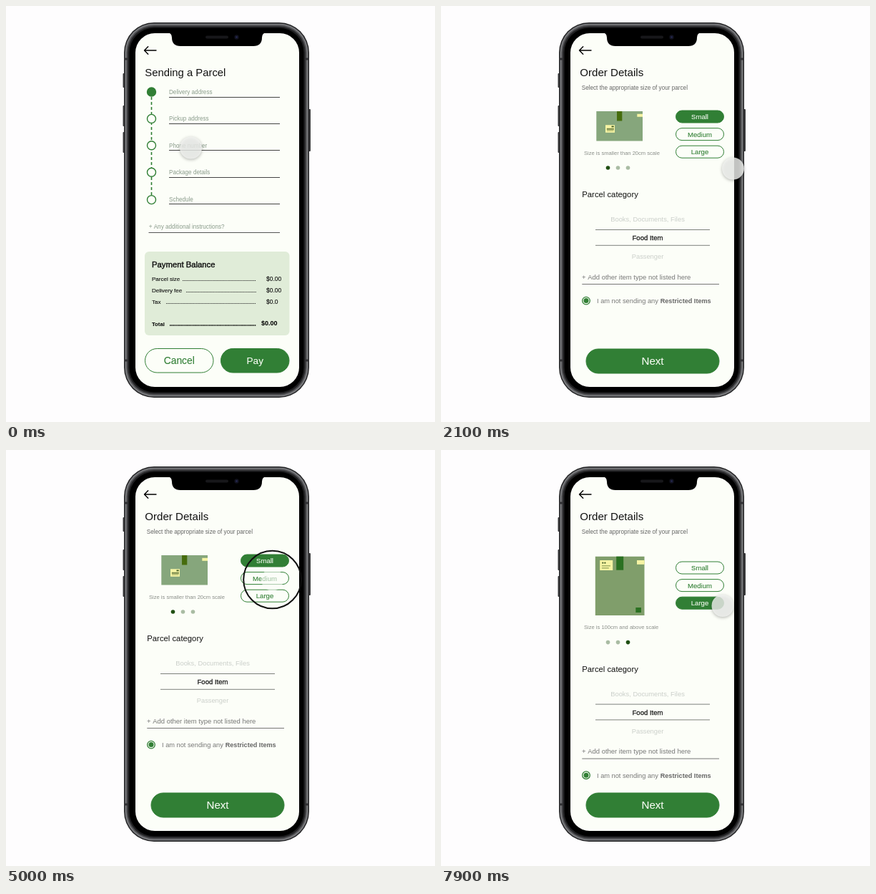
Animation of 600x581 px, one loop 8 s. Source, as an HTML page with a canvas:

```html
<!DOCTYPE html>
<html lang="en">
<head>
<meta charset="utf-8">
<title>Parcel order</title>
<style>
  html, body { margin: 0; width: 100%; height: 100%; overflow: hidden; background: #fefdfe; }
  canvas { display: block; width: 600px; height: 581px; }
</style>
</head>
<body>
<canvas id="stage"></canvas>
<script>
const W = 600, H = 581, LOOP = 8000;
const GREEN = '#317f35', BG = '#fcfef8', HINT = '#8a9b8b', YELLOW = '#f6f4a4';
const canvas = document.getElementById('stage');
const ctx = canvas.getContext('2d');
const ratio = window.devicePixelRatio || 1;
canvas.width = W * ratio;
canvas.height = H * ratio;

function box(x, y, w, h, r, fill, stroke, width = 1) {
  ctx.beginPath();
  ctx.roundRect(x, y, w, h, r);
  if (fill) { ctx.fillStyle = fill; ctx.fill(); }
  if (stroke) { ctx.strokeStyle = stroke; ctx.lineWidth = width; ctx.stroke(); }
}

function disc(x, y, r, fill, stroke, width = 1.4) {
  ctx.beginPath();
  ctx.arc(x, y, r, 0, Math.PI * 2);
  if (fill) { ctx.fillStyle = fill; ctx.fill(); }
  if (stroke) { ctx.strokeStyle = stroke; ctx.lineWidth = width; ctx.stroke(); }
}

function line(x1, y1, x2, y2, color, width = 1, dash = []) {
  ctx.setLineDash(dash);
  ctx.strokeStyle = color;
  ctx.lineWidth = width;
  ctx.beginPath();
  ctx.moveTo(x1, y1);
  ctx.lineTo(x2, y2);
  ctx.stroke();
  ctx.setLineDash([]);
}

// heavy: extra outline that gives a medium weight
function text(s, x, y, size, color, { bold = false, align = 'left', heavy = 0 } = {}) {
  ctx.font = `${bold ? 'bold ' : ''}${size}px "Liberation Sans", Arial, sans-serif`;
  ctx.textAlign = align;
  ctx.fillStyle = color;
  ctx.fillText(s, x, y);
  if (heavy) {
    ctx.strokeStyle = color;
    ctx.lineWidth = heavy;
    ctx.strokeText(s, x, y);
  }
}

function pill(label, x, y, w, h, size, filled) {
  box(x, y, w, h, h / 2, filled ? GREEN : BG, GREEN, 1);
  text(label, x + w / 2, y + h / 2 + size * 0.36, size, filled ? '#f6fbf2' : GREEN, { align: 'center', heavy: 0.1 });
}

function phone() {
  for (const [x, y, w, h] of [[163.5, 94, 3, 20], [163.5, 139, 3, 29], [163.5, 176, 3, 29], [423, 144, 3, 59]])
    box(x, y, w, h, 1, '#3a3a3c');
  const shells = [[0, '#202022'], [1.4, '#77787b'], [3.6, '#4a4a4d'], [5.4, '#202022'], [7.6, '#000']];
  for (const [d, color] of shells)
    box(165 + d, 23 + d, 259 - 2 * d, 524 - 2 * d, 42 - d, color);
  for (const y of [72.5, 493.5]) {
    box(165, y, 6, 3, 0, '#303033');
    box(418, y, 6, 3, 0, '#303033');
  }
  box(181, 38, 229, 494, 27, BG);

  ctx.fillStyle = '#000';
  ctx.beginPath();
  ctx.moveTo(226, 37);
  ctx.quadraticCurveTo(232, 38, 232, 44);
  ctx.quadraticCurveTo(232, 56, 244, 56);
  ctx.lineTo(346, 56);
  ctx.quadraticCurveTo(358, 56, 358, 44);
  ctx.quadraticCurveTo(358, 38, 364, 37);
  ctx.fill();
  box(279, 41.5, 32, 4, 2, '#17171a');
  disc(322.5, 43.5, 3.2, '#11121e');
  disc(322.5, 43.5, 1.4, '#23264c');
}

function header(title) {
  ctx.lineCap = ctx.lineJoin = 'round';
  ctx.strokeStyle = '#000';
  ctx.lineWidth = 1.4;
  ctx.beginPath();
  ctx.moveTo(210, 62);
  ctx.lineTo(193.5, 62);
  ctx.moveTo(198.7, 56.8);
  ctx.lineTo(193.5, 62);
  ctx.lineTo(198.7, 67.2);
  ctx.stroke();
  ctx.lineCap = 'butt';
  ctx.lineJoin = 'miter';
  text(title, 194.3, 97.5, title.length > 14 ? 14.85 : 15.1, '#111');
}

function formScreen() {
  header('Sending a Parcel');
  line(203.5, 120, 203.5, 270, GREEN, 1.6, [4, 3]);
  const rows = ['Delivery address', 'Pickup address', 'Phone number', 'Package details', 'Schedule'];
  rows.forEach((label, i) => {
    const y = 120 + i * 37.4;
    disc(203.5, y + (i === 4 ? 1 : 0), 6, i ? BG : GREEN, GREEN);
    text(label, 228, y + 3, 8.13, HINT);
    line(228, Math.round(y + 6.5) + 0.5, 383, Math.round(y + 6.5) + 0.5, '#444');
  });
  text('+ Any additional instructions?', 199.7, 311, 8.13, HINT);
  line(199.5, 316.5, 383, 316.5, '#555');

  box(194, 343, 202.5, 117, 6, '#e0ecd8');
  text('Payment Balance', 204, 364.5, 11.3, '#111', { heavy: 0.4 });
  const costs = [['Parcel size', 247, '$0.00', 384], ['Delivery fee', 252, '$0.00', 400], ['Tax', 224, '$0.0', 416]];
  for (const [label, x, cost, y] of costs) {
    text(label, 204, y, 8, '#111', { heavy: 0.12 });
    line(x, y - 0.5, 350, y - 0.5, '#333', 1, [1.2, 0.9]);
    text(cost, 364, y, 8.5, '#111', { heavy: 0.12 });
  }
  text('Total', 204, 446.5, 7.7, '#000', { bold: true });
  line(229, 446, 350, 446, '#000', 1.3, [1.5, 0.7]);
  text('$0.00', 357, 446, 9, '#000', { bold: true });

  pill('Cancel', 194.5, 478.5, 95.5, 33.5, 13.9, false);
  pill('Pay', 300.5, 478.5, 95.5, 33.5, 13.6, true);
}

function note(x, y, w, h, angle = 0) {
  ctx.save();
  ctx.translate(x, y);
  ctx.rotate(angle);
  box(-w / 2, -h / 2, w, h, 0, YELLOW);
  disc(-w * 0.27, -h * 0.24, w * 0.06, '#405a22');
  disc(-w * 0.1, -h * 0.24, w * 0.06, '#405a22');
  line(-w * 0.35, h * 0.06, w * 0.32, h * 0.06, '#71843f', 0.9);
  line(-w * 0.35, h * 0.28, w * 0.2, h * 0.28, '#71843f', 0.9);
  ctx.restore();
}

const parcels = [
  () => {
    box(217.3, 147, 64.7, 41.5, 0, '#86a67c');
    box(246, 147, 7.3, 13.5, 0, '#466c0e');
    box(274.3, 150.8, 7.7, 4, 0, YELLOW);
    box(230, 166.2, 13, 10.6, 0, YELLOW);
    box(238.5, 167.5, 3.2, 1.8, 0, '#405a22');
    line(232, 171.8, 241.5, 171.8, '#4b622b', 2, [1.5, 0.5]);
    line(232, 174, 241.5, 174, '#71843f', 0.8);
  },
  () => {
    box(220, 149, 66, 59, 0, '#98b88a');
    box(248.2, 149, 9, 18.5, 0, '#2b7122');
    box(220, 153.5, 10, 5.5, 0, YELLOW);
    note(233, 173.3, 17.5, 13.5, -0.35);
  },
  () => {
    box(215.8, 148.7, 68.7, 82.3, 0, '#809e6b');
    box(245.2, 148.7, 10, 19, 0, '#2b7122');
    box(274, 154, 10.5, 5.8, 0, YELLOW);
    note(231.2, 161, 18, 14);
    box(272.3, 220, 7.6, 7, 0, '#2b7122');
  }
];

const scales = ['smaller than 20cm', 'smaller than 50cm', '100cm and above'];

function orderScreen(size) {
  header('Order Details');
  text('Select the appropriate size of your parcel', 196.7, 116.5, 8.17, '#666');
  parcels[size]();

  ['Small', 'Medium', 'Large'].forEach((label, i) => {
    pill(label, 328.5, (size === 2 ? 156 : 146) + i * 24.6, 67, 17, 9.55, i === size);
  });

  const drop = [0, 20, 42.6][size];
  ctx.save();
  ctx.translate(0, drop);
  text(`Size is ${scales[size]} scale`, 200, 207.7, 7.57, '#8b8f8a');
  for (let i = 0; i < 3; i++)
    disc(233.5 + i * 14, 226, 2.8, i === size ? '#1f4f12' : '#a9bca3');

  if (size === 1) ctx.translate(-0.7, 0);
  text('Parcel category', 197.3, 267.3, 11.3, '#111');
  text('Books, Documents, Files', 289, 301.3, 9.4, '#cbcfca', { align: 'center' });
  text('Food Item', 289, 327.4, 9.55, '#222', { align: 'center', heavy: 0.3 });
  text('Passenger', 289, 353, 9.3, '#cbcfca', { align: 'center' });
  line(216, 312.5, 376, 312.5, '#7d807c');
  line(216, 334.3, 376, 334.3, '#7d807c');
  text('+ Add other item type not listed here', 197, 381.7, 9.48, '#777');
  line(197.3, 388.5, 389, 388.5, '#777');
  if (size === 1) ctx.translate(0.7, 0);

  disc(203, 411.6, 5.3, BG, GREEN, 1.3);
  disc(203, 411.6, 3.5, GREEN);
  text('I am not sending any', 218, 415, 9.26, '#777');
  text('Restricted Items', 306.7, 415, 9.13, '#666', { bold: true });
  ctx.restore();

  pill('Next', 203, 479, 186, 34, 15.1, true);
}

// time, x, y
const path = [
  [0, 258.5, 198], [300, 267.5, 232.5], [1000, 267.5, 232.5], [2100, 408.5, 227],
  [3700, 385.5, 190.5], [4800, 372.5, 181], [5200, 372.5, 181],
  [6800, 381.5, 205.5], [7100, 381.5, 205.5], [7900, 394, 217.5], [8000, 394, 217.5]
];
const taps = [200, 4880, 6900];
const TAP = 220;

function pointAt(t) {
  const i = Math.max(1, path.findIndex(p => p[0] > t));
  const [t0, x0, y0] = path[i - 1], [t1, x1, y1] = path[i];
  const k = (t - t0) / (t1 - t0);
  const e = k * k * (3 - 2 * k) * 0.4 + k * 0.6;
  return [x0 + (x1 - x0) * e, y0 + (y1 - y0) * e];
}

function cursor(t) {
  const [x, y] = pointAt(t);
  const start = taps.find(s => t >= s && t < s + TAP);
  const tapping = start !== undefined;
  ctx.save();
  if (!tapping) {
    ctx.shadowColor = 'rgba(0,0,0,0.35)';
    ctx.shadowBlur = 4 * ratio;
    ctx.shadowOffsetY = 1.2 * ratio;
  }
  disc(x, y, 15.5, tapping ? 'rgba(250,252,248,0.6)' : 'rgba(243,244,241,0.8)');
  ctx.restore();
  if (tapping) {
    const k = Math.min(1, (t - start) / 120);
    disc(x, y, 16 + 24.3 * (1 - (1 - k) ** 2), null, '#111', 2);
  }
}

function draw(t) {
  ctx.setTransform(ratio, 0, 0, ratio, 0, 0);
  ctx.fillStyle = '#fefdfe';
  ctx.fillRect(0, 0, W, H);
  phone();
  if (t < 800) formScreen();
  else orderScreen(t < 5200 ? 0 : t < 7200 ? 1 : 2);
  cursor(t);
}

const begin = performance.now();
function tick() {
  draw((performance.now() - begin) % LOOP);
  requestAnimationFrame(tick);
}
tick();
</script>
</body>
</html>
```
